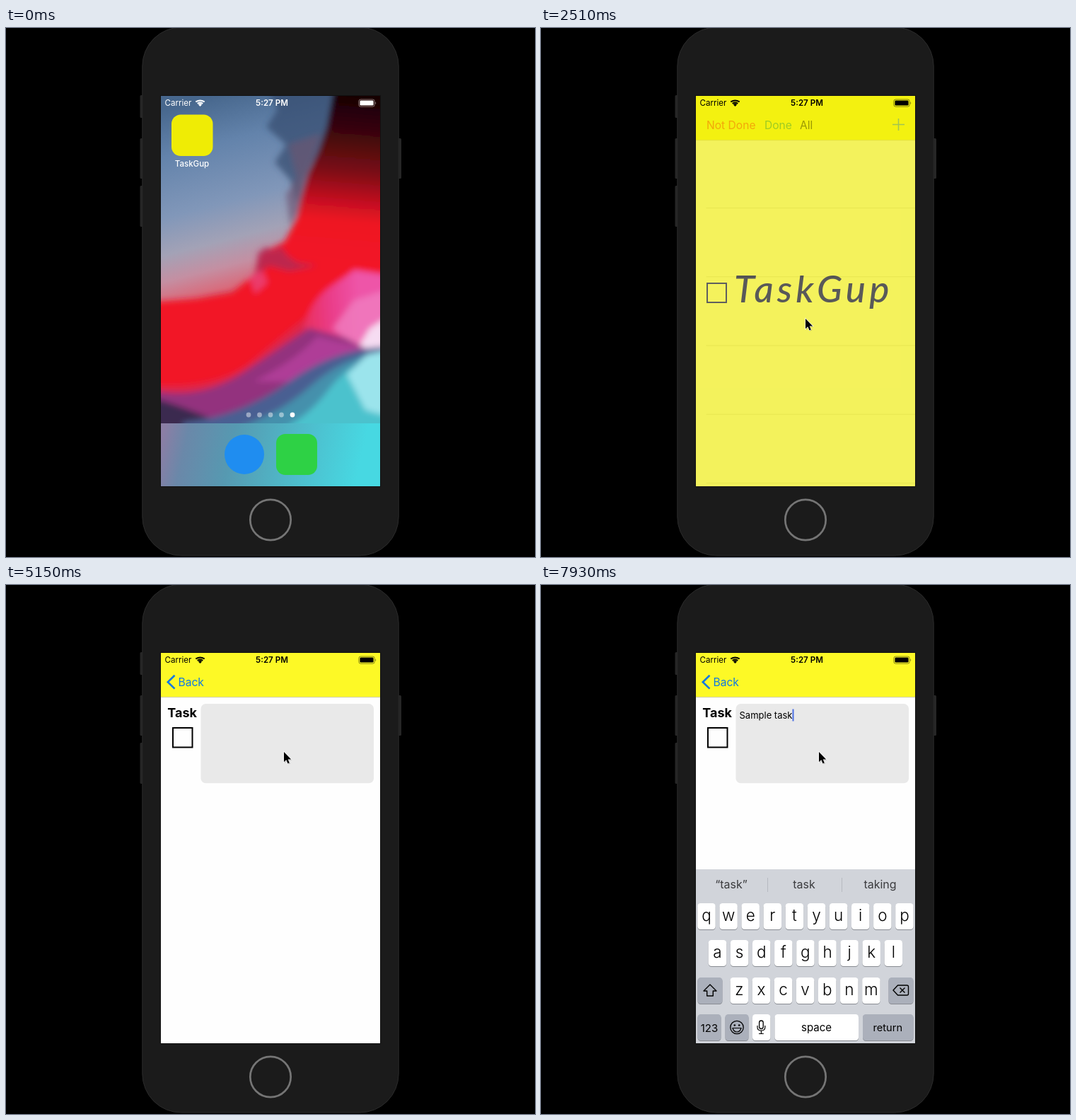
Write an HTML page that moves like this. It is 748 by 748 pixels and loops after 8000 ms.

```html
<!DOCTYPE html>
<html lang="en">
<head>
<meta charset="utf-8">
<title>To-do app demo</title>
<style>
html, body { margin: 0; width: 100%; height: 100%; overflow: hidden; background: #000; }
svg { display: block; width: 100%; height: 100%; }
text { font-family: Inter, Roboto, sans-serif; white-space: pre; }
.mid { text-anchor: middle; }
.splash { font: italic 500 53px Lato, sans-serif; letter-spacing: 5.2px; }
</style>
</head>
<body>
<svg id="stage" viewBox="0 0 748 748" xmlns="http://www.w3.org/2000/svg"></svg>
<script>
const LOOP = 8000;
const SCREEN = { x: 219, y: 96, w: 310, h: 552 };
const APP = 'TaskGup';
const PHRASE = 'Sample task';
const BLUE = '#1179e2';

const rect = (x, y, w, h, fill, extra = '') =>
  `<rect x="${x}" y="${y}" width="${w}" height="${h}" fill="${fill}" ${extra}/>`;
const path = (d, fill, extra = '') => `<path d="${d}" fill="${fill}" ${extra}/>`;
const line = (d, color, width, extra = '') =>
  path(d, 'none', `stroke="${color}" stroke-width="${width}" ${extra}`);
const text = (x, y, size, str, fill = '#000', extra = '') =>
  `<text x="${x}" y="${y}" font-size="${size}" fill="${fill}" ${extra}>${str}</text>`;
const gradient = (id, dir, stops) =>
  `<linearGradient id="${id}" gradientUnits="userSpaceOnUse" ${dir}>` +
  stops.map(([o, c]) => `<stop offset="${o}" stop-color="${c}"/>`).join('') + '</linearGradient>';
const screenRect = (fill, extra) => rect(SCREEN.x, SCREEN.y, SCREEN.w, SCREEN.h, fill, extra);

function statusBar(color) {
  const arc = (r, dx) => `M${274.5 - dx} ${110 - r}Q274.5 ${110 - r - dx * 0.62} ${274.5 + dx} ${110 - r}`;
  return text(224.5, 110.2, 11.6, 'Carrier', color) +
    line(arc(5.6, 6.2) + arc(3.2, 3.8), color, 2) +
    path('M271.9 108.2Q274.5 105.8 277.1 108.2L274.5 111Z', color) +
    text(376, 110.2, 11.6, '5:27 PM', color, 'class="mid" font-weight="600"') +
    rect(498.8, 101, 22.4, 10.2, 'none', `rx="2.8" stroke="${color}" stroke-opacity=".45"`) +
    rect(500.4, 102.6, 19.2, 7, color, 'rx="1.4"') +
    path('M522.3 104.4Q524.2 106.1 522.3 107.8Z', color, 'opacity=".5"');
}

function wallpaper() {
  return screenRect('url(#sky)') + '<g filter="url(#soft)">' +
    // dark upper sky
    path('M370 85H472L458 140 440 180 420 215 412 250 402 215 380 190 396 165 368 140 384 115Z', '#344b6d', 'opacity=".7"') +
    path('M400 165 445 150 428 205 416 255 402 282 396 235 412 212Z', '#6d5470', 'opacity=".65"') +
    // red body
    path('M464 85 454 140 442 175 428 205 418 240 412 268 394 302 362 318 350 350 320 374 270 383 205 388V580H545V85Z', 'url(#crimson)') +
    path('M356 318 368 309 378 315 388 308 398 322 412 332 440 336 400 344 372 336 352 352Z', '#b12a58', 'opacity=".8"') +
    path('M344 352 362 342 370 360 352 376Z', '#e84a86', 'opacity=".7"') +
    path('M205 505Q300 512 350 470T430 405L545 380V470L330 545H205Z', '#d92a50', 'opacity=".8"') +
    // pink to white on the right
    path('M420 425Q430 385 460 365T492 342L545 350V470L440 450Z', 'url(#pink)') +
    path('M462 425 492 385 545 368V465L495 450Z', '#f181c2', 'opacity=".75"') +
    path('M498 452 514 425 545 405V462Z', '#f6dcf2') +
    // purple ridge
    path('M205 512Q275 528 340 484T428 424L480 438 512 455 440 495 330 570H205Z', '#93307e') +
    path('M350 500Q410 470 440 436L512 454 400 500Z', '#b9409f', 'opacity=".75"') +
    path('M205 522Q250 535 300 556L320 580H205Z', '#3b2b50') +
    // blue to cyan
    path('M250 558Q330 550 400 500T545 451V600H250Z', '#4a5f92') +
    path('M300 575Q380 552 430 507T545 456V660H300Z', '#4490ac') +
    path('M360 580Q420 560 455 513T545 462V660H360Z', '#4cc2cd') +
    path('M482 490 510 462 545 454V550L508 540Z', '#9be4ec') +
    '</g>';
}

function homeScreen() {
  const dots = [343, 358.5, 374, 389.5, 405].map((x, i) =>
    `<circle cx="${x}" cy="547" r="3.4" fill="#fff" opacity="${i === 4 ? 1 : 0.45}"/>`).join('');
  return wallpaper() + '<g id="icons">' +
    rect(200, 559, 350, 110, 'url(#dock)') + dots +
    '<circle cx="337" cy="603" r="28" fill="#1f8df0"/>' +
    rect(382, 574, 58, 58, '#2ed145', 'rx="13"') +
    `<g id="appIcon">${rect(234, 122.5, 58.5, 58.5, '#efec05', 'rx="13"')}` +
    rect(234, 122.5, 58.5, 58.5, '#000', 'id="press" rx="13" opacity=".4"') + '</g>' +
    text(263, 196, 11.5, APP, '#fff', 'class="mid" font-weight="500"') +
    '</g>' + statusBar('#fff') + screenRect('#000', 'id="dim"');
}

function keyboard() {
  const key = (x, y, w, fill = '#fff', id = '') =>
    rect(x, y + 1, w, 37, '#898c92', 'rx="4.2"') + rect(x, y, w, 37, fill, `rx="4.2" ${id}`);
  const grey = '#abb0bb';
  const letters = (row, x, y) => [...row].map((c, i) =>
    key(x + i * 31.1 - 12.7, y, 25.4) +
    text(x + i * 31.1, y + 25.3, 22.5, c, '#000', 'class="mid letter" font-weight="300"')).join('');
  const slots = [269, 372, 479.5].map(x =>
    text(x, 429, 16, '', '#1c1c1e', 'class="mid oldHint"') +
    text(x, 429, 16, '', '#1c1c1e', 'class="mid newHint"')).join('');
  return rect(219, 402, 311, 247, '#d1d4da') + line('M320.5 414V434M425.5 414V434', '#b7bac1', 1) + slots +
    letters('qwertyuiop', 234, 450) + letters('asdfghjkl', 249.5, 502) + letters('zxcvbnm', 280.3, 555) +
    key(221.5, 555, 35, grey, 'id="shift"') + key(491.5, 555, 35, grey) +
    path('M239 565 248 574H243.3V581H234.7V574H230Z', 'none', 'id="arrow" stroke="#000" stroke-width="1.4" stroke-linejoin="round"') +
    line('M498 573 504.5 566H517.5Q519.5 566 519.5 568V578Q519.5 580 517.5 580H504.5ZM507.5 569.5 514.5 576.5M514.5 569.5 507.5 576.5', '#000', 1.4, 'stroke-linejoin="round"') +
    key(221.5, 607, 33, grey) + key(260.5, 607, 33, grey) + key(299, 607, 25.4) +
    key(330.5, 607, 118.5) + key(455, 607, 71.5, grey) +
    text(238, 631.5, 15, '123', '#000', 'class="mid"') +
    text(389.5, 630.5, 15, 'space', '#000', 'class="mid"') +
    text(490.3, 630.5, 14.6, 'return', '#000', 'class="mid"') +
    '<circle cx="277" cy="625.5" r="9.2" fill="none" stroke="#000" stroke-width="1.3"/>' +
    '<circle cx="273.8" cy="622.5" r="1.3"/><circle cx="280.2" cy="622.5" r="1.3"/>' +
    path('M271 626.5H283Q281.5 632 277 632T271 626.5Z', 'none', 'stroke="#000" stroke-width="1.2"') +
    rect(308.6, 616, 5.6, 11.5, 'none', 'rx="2.8" stroke="#000" stroke-width="1.3"') +
    line('M306 623V625.5Q306 630 311.4 630T316.8 625.5V623M311.4 630V634.5M308 634.5H314.8', '#000', 1.2);
}

function appScreen() {
  const rows = [254.5, 351.8, 449, 546.2, 643.4].map(y => `M233.5 ${y}H530`).join('');
  return `<g id="list">${screenRect('#fefefe')}${line(rows, '#dadada', 1)}</g>` +
    screenRect('#000', 'id="shade"') +
    '<g id="detail">' + screenRect('#fefefe') +
    text(228.3, 187, 18, 'Task', '#000', 'font-weight="700"') +
    rect(236, 202, 27.5, 27.5, 'none', 'stroke="#000" stroke-width="2"') +
    rect(275.5, 168, 244.5, 112.3, '#e9e9e9', 'rx="7"') +
    text(280.5, 189, 13, '', '#000', 'id="typed"') +
    rect(0, 175.5, 2, 17, '#4a6fe3', 'id="caret"') + '</g>' +
    rect(219, 96, 311, 62.5, '#fdf926') + line('M219 158.7H530', '#cfcda0', 1) +
    '<g id="listNav">' +
    text(234, 143, 15.6, 'Not Done', '#fb2c12') + text(316, 143, 15.6, 'Done', '#0a9058') + text(366, 143, 15.6, 'All') +
    line('M497 136.5H514M505.5 128V145', BLUE, 1.5, 'id="plus"') + '</g>' +
    `<g id="backNav">${text(243.5, 143, 15.6, 'Back', BLUE)}${line('M238.5 127.8 228.8 137.2 238.5 146.6', BLUE, 2.6)}</g>` +
    `<g id="keys">${keyboard()}</g>` +
    '<g id="splash">' + screenRect('#efec05') +
    rect(235, 361, 27, 27, 'none', 'stroke="#0a0a0a" stroke-width="2"') +
    `<text x="273" y="388" class="splash">${APP}</text></g>` +
    statusBar('#000');
}

document.getElementById('stage').innerHTML = '<defs>' +
  gradient('sky', 'x1="275" y1="100" x2="350" y2="392"',
    [[0, '#47678d'], [0.22, '#6383ab'], [0.5, '#8197b9'], [0.67, '#a3a2b6'], [0.79, '#c48fa2'], [0.89, '#d96a7b'], [1, '#c43c50']]) +
  gradient('crimson', 'x1="490" y1="96" x2="470" y2="330"',
    [[0, '#180205'], [0.2, '#37060a'], [0.45, '#7a0b15'], [0.63, '#c21020'], [0.76, '#ef1522'], [1, '#f21628']]) +
  gradient('pink', 'x1="420" y1="400" x2="500" y2="395"', [[0, '#e92f5c'], [0.5, '#ea3d8a'], [1, '#ee55a8']]) +
  gradient('dock', 'x1="225" y1="560" x2="500" y2="620"',
    [[0, '#8b7ea5'], [0.12, '#6a88a9'], [0.35, '#5699b1'], [0.65, '#4fb8c8'], [1, '#47d8e2']]) +
  '<filter id="soft" x="-10%" y="-10%" width="120%" height="120%"><feGaussianBlur stdDeviation="4"/></filter>' +
  `<clipPath id="glass">${screenRect('#fff')}</clipPath>` +
  '<clipPath id="cardClip"><rect id="card"/></clipPath></defs>' +
  rect(0, 0, 748, 748, '#000') +
  [[189.5, 95, 32], [189.5, 156, 57], [189.5, 223, 58], [552, 156, 57]].map(([x, y, h]) => rect(x, y, 7, h, '#262626', 'rx="1.5"')).join('') +
  rect(192.8, -1, 362.4, 747, '#1b1b1b', 'rx="55" stroke="#2b2b2b" stroke-width="1"') +
  rect(218, 95, 312, 554, '#111') +
  '<circle cx="374" cy="695.5" r="28.7" fill="none" stroke="#757575" stroke-width="2.7"/>' +
  `<g clip-path="url(#glass)"><g id="home">${homeScreen()}</g>` +
  `<g id="app" clip-path="url(#cardClip)"><g id="content">${appScreen()}</g></g></g>` +
  '<g id="cursor">' + path('M1 1V15.5L4.4 12.4 6.6 17.6 9 16.5 6.8 11.5H11.3Z', '#000', 'opacity=".25"') +
  path('M0 0V14.3L3.3 11.3 5.5 16.4 7.8 15.4 5.7 10.4H10.2Z', '#000', 'stroke="#fff" stroke-width="1.2" paint-order="stroke"') + '</g>';

const $ = Object.fromEntries([...document.querySelectorAll('[id]')].map(e => [e.id, e]));
const letters = [...document.querySelectorAll('.letter')].map(el => ({ el, c: el.textContent }));
const oldHints = document.querySelectorAll('.oldHint');
const newHints = document.querySelectorAll('.newHint');

const HINTS = ['The I And', '“S” Sh Still', '“Sa” Same Saw', '“Sam” Same Sample', '“Samp” Sample Samples',
  '“Sampl” Sample Samples', '“Sample” Samples Sampled', 'of and is', '“t” the to', '“ta” take talk',
  '“tas” task taste', '“task” task taking'].map(s => s.split(' '));

// time, x, y; equal times make a jump
const MOVES = [
  [710, 525, 376], [830, 525, 376], [830, 323, 210], [1010, 323, 210], [1010, 270, 168], [1090, 270, 168],
  [1090, 250, 155], [1270, 250, 155], [1270, 252, 155], [1360, 252, 155], [1360, 253, 156], [1980, 253, 156],
  [2180, 325, 320], [2420, 374, 411], [3170, 374, 411], [3210, 374, 405], [3450, 396, 320], [3700, 448, 185],
  [3840, 473, 145], [4000, 452, 136], [4090, 460, 136], [4270, 500, 135], [4360, 502, 136], [4700, 502, 136],
  [4900, 440, 190], [5090, 393, 236], [LOOP, 393, 236]];

const clamp = v => Math.max(0, Math.min(1, v));
const ramp = (t, a, b) => clamp((t - a) / (b - a));
const lerp = (a, b, p) => a + (b - a) * p;
const easeOut = p => 1 - (1 - p) ** 3;
const set = (el, attrs) => { for (const k in attrs) el.setAttribute(k, attrs[k]); };
const show = (el, on) => set(el, { visibility: on ? 'inherit' : 'hidden' });
const shift = (x, y = 0) => `translate(${x} ${y})`;
const put = (el, str) => { if (el.textContent !== str) el.textContent = str; };

function stepTime(t) {
  if (t < 1796) return t;
  const base = t < 5420 ? 1796 : t < 6076 ? 5420 : 6076;
  return base + Math.floor((t - base) / 88.1) * 88.1;
}

const keyTime = i => i === 0 ? 6340 : 6530 + (i - 1) * 145;

function moveCursor(t) {
  show($.cursor, t >= MOVES[0][0]);
  const i = MOVES.findIndex(m => m[0] > t);
  if (i < 1) return;
  const [a, b] = [MOVES[i - 1], MOVES[i]];
  const p = ramp(t, a[0], b[0]);
  set($.cursor, { transform: shift(lerp(a[1], b[1], p), lerp(a[2], b[2], p)) });
}

function launch(t) {
  const grow = tau => t < 1760 ? 0 : t > 2500 ? 1 : 1 - Math.exp((1760 - t) / tau);
  const p = grow(89), q = grow(110);
  const w = lerp(58.5, SCREEN.w, p), h = lerp(58.5, SCREEN.h, q);
  const x = lerp(263.25, 374, p) - w / 2, y = lerp(151.75, 372, p) - h / 2;
  const s = 1 - 0.056 * p;
  show($.home, p < 1);
  show($.app, t >= 1760);
  show($.appIcon, t < 1760);
  show($.press, t >= 1630 && t < 1760);
  set($.icons, { transform: `${shift(374, 372)} scale(${s}) ${shift(-374, -372)}` });
  set($.dim, { opacity: 0.7 * p });
  set($.card, { x, y, width: w, height: h, rx: 14 * clamp((1 - p) * 6) });
  set($.content, { transform: `${shift(x, y)} scale(${w / SCREEN.w}) ${shift(-SCREEN.x, -SCREEN.y)}` });
  set($.splash, { opacity: 1 - ramp(t, 2370, 2740) });
}

function push(t) {
  const p = easeOut(ramp(t, 4560, 5120));
  show($.list, p < 1);
  show($.detail, p > 0);
  set($.list, { transform: shift(-93 * p) });
  set($.shade, { opacity: p < 1 ? 0.1 * p : 0 });
  set($.detail, { transform: shift(SCREEN.w * (1 - p)) });
  set($.listNav, { opacity: clamp(1 - 1.6 * p), transform: shift(-50 * p) });
  set($.plus, { opacity: t >= 4430 ? 0.3 : 1 });
  set($.backNav, { opacity: clamp(1.6 * p - 0.6), transform: shift(70 * (1 - p)) });
}

function type(t) {
  let n = 0;
  while (n < PHRASE.length && t >= keyTime(n)) n++;
  put($.typed, PHRASE.slice(0, n));
  const end = n ? $.typed.getComputedTextLength() : 0;
  set($.caret, { x: 280.5 + end });
  show($.caret, t >= 5420 && !(t >= 5850 && t < 6070));

  const up = easeOut(ramp(t, 5370, 5800));
  show($.keys, up > 0);
  set($.keys, { transform: shift(0, 247 * (1 - up)) });
  for (const { el, c } of letters) put(el, n ? c : c.toUpperCase());
  set($.shift, { fill: n ? '#abb0bb' : '#fff' });
  set($.arrow, { fill: n ? 'none' : '#000' });

  const fade = n ? ramp(t, keyTime(n - 1), keyTime(n - 1) + 110) : 1;
  HINTS[n].forEach((word, i) => {
    put(newHints[i], word);
    put(oldHints[i], n ? HINTS[n - 1][i] : '');
    set(newHints[i], { opacity: fade });
    set(oldHints[i], { opacity: clamp(1 - 1.3 * fade) });
  });
}

function draw(now) {
  const t = stepTime(now % LOOP);
  launch(t);
  push(t);
  type(t);
  moveCursor(t);
}

const start = performance.now();
(function tick() {
  draw(performance.now() - start);
  requestAnimationFrame(tick);
})();
</script>
</body>
</html>
```
